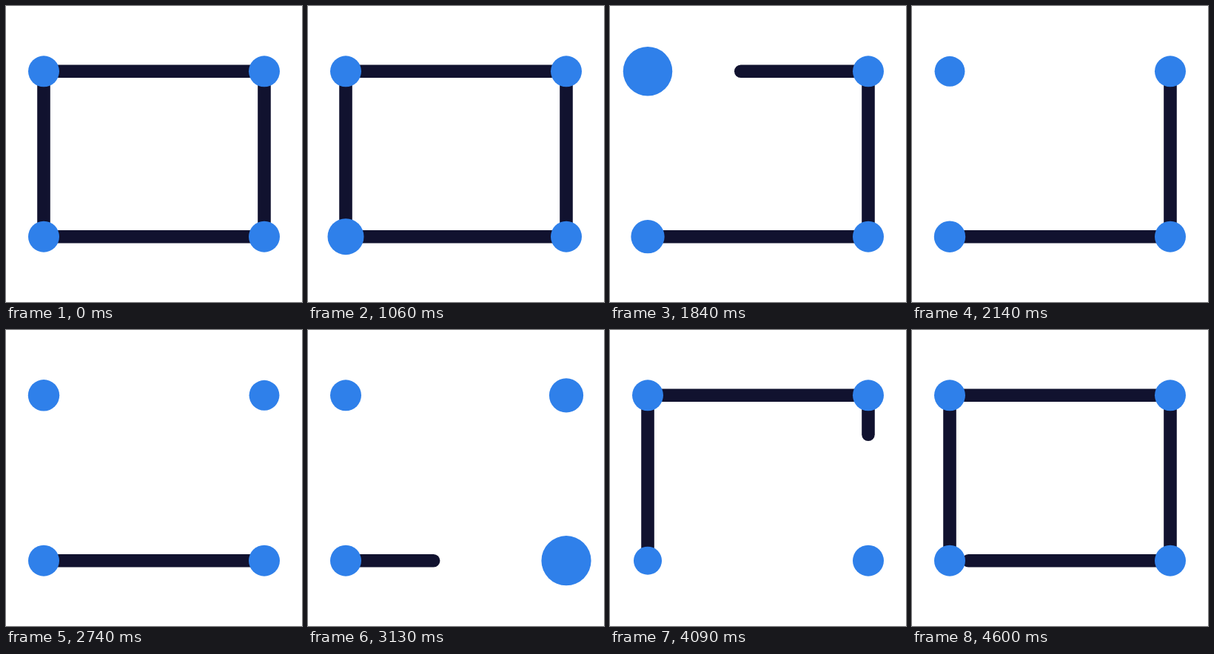
An HTML page for the animation above (4.63 s loop, 400x400 px).

```html
<!DOCTYPE html>
<html lang="en">
<head>
<meta charset="utf-8">
<title>Rectangle loop</title>
<style>
  html, body { margin: 0; width: 100%; height: 100%; overflow: hidden; background: #fff; }
  svg { display: block; width: 100%; height: 100%; }
</style>
</head>
<body>
<svg id="stage" viewBox="0 0 400 400">
  <g id="edges" stroke="#11122f" stroke-width="17.6" stroke-linecap="round"></g>
  <g id="dots" fill="#2f80ea"></g>
</svg>
<script>
const LOOP = 4630, START = 1030, STEP = 600, ERASE = 500;
const DRAW = START + 4 * STEP, DRAW_TIME = LOOP - DRAW;
const BEAT = 300, RADIUS = 21;
const SCALES = [1, 1.6, 0.9, 1.1, 1];

// Clockwise from the bottom left
const corners = [[51, 311.7], [51, 88.3], [349, 88.3], [349, 311.7]];

const clamp = v => Math.min(1, Math.max(0, v));
const mix = (a, b, p) => a + (b - a) * p;
const cubicOut = p => 1 - (1 - p) ** 3;
const cubicInOut = p => p < 0.5 ? 4 * p ** 3 : 1 - 4 * (1 - p) ** 3;

function add(parent, tag, attrs) {
  const el = document.createElementNS("http://www.w3.org/2000/svg", tag);
  set(el, attrs);
  document.getElementById(parent).appendChild(el);
  return el;
}

function set(el, attrs) {
  for (const key in attrs) el.setAttribute(key, attrs[key]);
}

let total = 0;
const edges = corners.map((a, i) => {
  const b = corners[(i + 1) % 4];
  const length = Math.hypot(b[0] - a[0], b[1] - a[1]);
  const edge = { a, b, length, offset: total, el: add("edges", "line", {}) };
  total += length;
  return edge;
});
const dots = corners.map(([cx, cy]) => add("dots", "circle", { cx, cy, r: RADIUS }));

// Swell, dip, small swell, rest
function pulse(t) {
  const beat = Math.floor(t / BEAT);
  if (beat < 0 || beat > 3) return 1;
  const p = t / BEAT - beat;
  const ease = beat ? cubicInOut : cubicOut;
  return mix(SCALES[beat], SCALES[beat + 1], ease(p));
}

function showEdge({ a, b, el }, from, to) {
  set(el, {
    x1: mix(a[0], b[0], from), y1: mix(a[1], b[1], from),
    x2: mix(a[0], b[0], to), y2: mix(a[1], b[1], to),
    visibility: to > from ? "visible" : "hidden"
  });
}

function render(t) {
  const drawn = total * (t - DRAW) / DRAW_TIME;
  edges.forEach((edge, i) => {
    if (t < DRAW) showEdge(edge, clamp((t - START - i * STEP) / ERASE), 1);
    else showEdge(edge, 0, clamp((drawn - edge.offset) / edge.length));
  });
  dots.forEach((dot, i) => {
    let scale = pulse(t - START - i * STEP);
    if (i === 0 && t >= DRAW) scale = pulse(t - DRAW);
    dot.setAttribute("r", RADIUS * scale);
  });
}

const begin = performance.now();
function tick() {
  render((performance.now() - begin) % LOOP);
  requestAnimationFrame(tick);
}
render(0);
requestAnimationFrame(tick);
</script>
</body>
</html>
```
